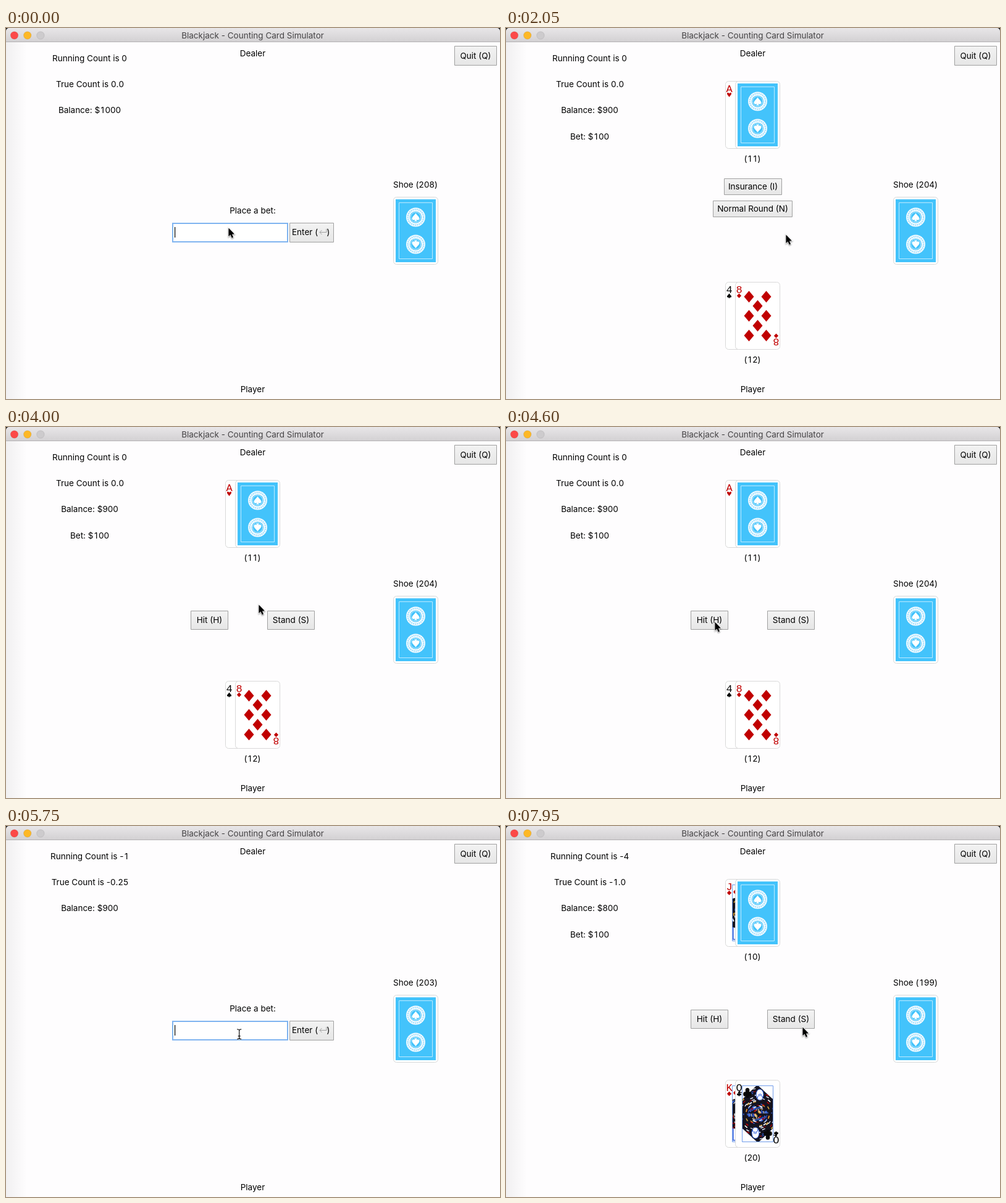
An HTML page with a canvas that plays this animation: 800 px wide and 602 px high, repeating every 8 s.

```html
<!DOCTYPE html>
<html lang="en">
<head>
<meta charset="utf-8">
<title>Blackjack</title>
<style>
  html, body { margin: 0; width: 100%; height: 100%; overflow: hidden; background: #fefdfe; }
  canvas { display: block; }
</style>
</head>
<body>
<canvas id="stage" width="800" height="602"></canvas>
<script>
const ctx = document.getElementById('stage').getContext('2d');
const LOOP = 8000, RED = '#c00000', BLUE = '#43c3fb', ROYAL = '#2f5fdc', GOLD = '#d9a53a', INK = '#141420';

// Suit outlines in a box from -1 to 1.
const SUITS = {
  S: new Path2D('M0-1C.3-.5 1-.1 1 .35C1 .8.35.85.12.5L.38 1H-.38L-.12.5C-.35.85-1 .8-1 .35C-1-.1-.3-.5 0-1Z'),
  H: new Path2D('M0 1C-.3.4-1 0-1-.5C-1-1.1-.2-1.1 0-.5C.2-1.1 1-1.1 1-.5C1 0 .3.4 0 1Z'),
  D: new Path2D('M0-1L1 0L0 1L-1 0Z'),
  C: new Path2D('M.15-.3L.15.5L.4 1H-.4L-.15.5V-.3Z')
};
for (const [x, y] of [[0, -.52], [-.5, .25], [.5, .25]]) {
  SUITS.C.moveTo(x + .48, y);
  SUITS.C.arc(x, y, .48, 0, 7);
}

// Each state keeps what it does not change.
const states = [
  { at: 0, mode: 'bet', running: '0', trueCount: '0.0', balance: 1000, shoe: 208, typeAt: 725 },
  { at: 1350, mode: 'insurance', balance: 900, shoe: 204, dealer: ['AH'], dealerSum: 11, player: ['4S', '8D'], playerSum: 12 },
  { at: 3950, mode: 'play' },
  { at: 4800, mode: 'bust', running: '-1', trueCount: '-0.25', shoe: 203, player: ['4S', '8D', 'KS'], playerSum: 22 },
  { at: 5450, mode: 'bet', typeAt: 6725 },
  { at: 7400, mode: 'play', running: '-4', trueCount: '-1.0', balance: 800, shoe: 199, dealer: ['JD'], dealerSum: 10, player: ['KD', 'QC'], playerSum: 20 }
];

// Pointer moves: start, end, x, y.
const moves = [
  [0, 0, 360, 324], [50, 850, 435, 330], [1250, 2050, 453, 335], [2100, 3400, 409, 288],
  [4300, 4600, 338, 316], [5100, 5400, 375, 339], [5600, 6400, 404, 326], [7300, 7950, 480, 326]
];

function paint(fill, stroke, lineWidth = 1) {
  if (fill) { ctx.fillStyle = fill; ctx.fill(); }
  if (stroke) { ctx.strokeStyle = stroke; ctx.lineWidth = lineWidth; ctx.stroke(); }
}

function rect(x, y, w, h, fill, stroke, lineWidth, radius = 0) {
  ctx.beginPath();
  ctx.roundRect(x, y, w, h, radius);
  paint(fill, stroke, lineWidth);
}

function ellipse(x, y, rx, ry, fill, stroke, lineWidth) {
  ctx.beginPath();
  ctx.ellipse(x, y, rx, ry, 0, 0, 2 * Math.PI);
  paint(fill, stroke, lineWidth);
}

const disc = (x, y, r, ...style) => ellipse(x, y, r, r, ...style);

function polygon(points) {
  ctx.beginPath();
  for (let i = 0; i < points.length; i += 2) ctx.lineTo(points[i], points[i + 1]);
  ctx.closePath();
}

// Digits all take the width of a zero.
function text(s, x, y, { align = 'center', color = '#000', font = '13.5px Inter, sans-serif' } = {}) {
  ctx.font = font;
  ctx.fillStyle = color;
  ctx.textAlign = 'left';
  const parts = s.split(/(\d)/);
  const width = part => ctx.measureText(/\d/.test(part) ? '0' : part).width;
  const total = parts.reduce((sum, part) => sum + width(part), 0);
  if (align === 'center') x -= total / 2;
  for (const part of parts) {
    const slot = width(part);
    ctx.fillText(part, x + (slot - ctx.measureText(part).width) / 2, y);
    x += slot;
  }
  return x;
}

function at(x, y, angle, draw) {
  ctx.save();
  ctx.translate(x, y);
  ctx.rotate(angle);
  draw();
  ctx.restore();
}

function vertical(y, h, top, bottom) {
  const g = ctx.createLinearGradient(0, y, 0, y + h);
  g.addColorStop(0, top);
  g.addColorStop(1, bottom);
  return g;
}

function suit(s, x, y, rx, ry, color, angle = 0) {
  at(x, y, angle, () => {
    ctx.scale(rx, ry);
    ctx.fillStyle = color;
    ctx.fill(SUITS[s]);
  });
}

function bothHalves(draw) {
  at(0, 0, 0, draw);
  at(73, 110, Math.PI, draw);
}

function cardBack(x, y) {
  rect(x + .5, y + .5, 72, 109, '#fff', '#d9d9d9', 1, 5);
  rect(x + 4, y + 4, 65, 102, BLUE);
  rect(x + 9.5, y + 9.5, 54, 91, null, '#bdeaff');
  for (const side of [-1, 1]) at(x + 36.5, y + 55 + 22 * side, side > 0 ? Math.PI : 0, () => {
    disc(0, 0, 15.5, '#f4fbff');
    ctx.setLineDash([2, 1.2]);
    disc(0, 0, 12.7, null, '#a5e0fc', 2.5);
    ctx.setLineDash([]);
    disc(0, 0, 9.6, BLUE);
    disc(0, 0, 8.2, null, '#e6f7ff', .8);
    suit('S', 0, 0, 6, 6.5, '#fff');
  });
}

// A robe of small strokes that circle the middle of the card.
function courtHalf(rank, s, color) {
  const queen = rank === 'Q', faceX = queen ? 40 : 45;
  let seed = rank.charCodeAt(0);
  const random = () => (seed = seed * 16807 % 2147483647) / 2147483647;
  random();
  ctx.beginPath();
  ctx.rect(11, 9, 51, 46.5);
  ctx.clip();
  if (!queen) {
    rect(22, 10, 31, 8, GOLD, INK);
    rect(56, 12, 4, 40, '#fff', ROYAL, 1.5);
  }
  ctx.save();
  polygon([11, 56, 11, 32, 36, queen ? 8 : 26, 62, 32, 62, 56]);
  paint(INK);
  ctx.clip();
  for (let i = 0; i < 150; i++) {
    const r = 3 + 40 * random(), a = Math.PI * (1 + random());
    ctx.beginPath();
    ctx.arc(36.5, 55, r, a, a + 5 / r);
    paint(null, [RED, GOLD, ROYAL, INK, '#e9edfa'][Math.floor(random() * 5)], 1 + random());
  }
  ctx.restore();
  ellipse(faceX, 24, queen ? 6 : 9, 9, '#fff', ROYAL);
  for (let i = -2; i <= 2; i++) rect(faceX + 2 * i, 22 + i * i, 1, 4, ROYAL);
  suit(s, 20, 21, 7, 8, color);
}

function pips(rank) {
  if (rank === 'A') return [[0, 0]];
  const corners = [[-14, -31], [14, -31], [-14, 32], [14, 32]];
  return rank === '4' ? corners : [...corners, [-14, 0], [14, 0], [0, -16], [0, 16]];
}

function card(name, x, y) {
  const [rank, s] = name, color = 'HD'.includes(s) ? RED : '#080808';
  at(x, y, 0, () => {
    rect(.5, .5, 72, 109, '#fff', '#d9d9d9', 1, 5);
    if ('JQK'.includes(rank)) {
      bothHalves(() => courtHalf(rank, s, color));
      rect(11.5, 9.5, 50, 91, null, '#6f9bea');
    } else {
      for (const [dx, dy] of pips(rank)) suit(s, 36.5 + dx, 55 + dy, s === 'D' ? 8 : 6.5, 9.5, color, dy > 0 ? Math.PI : 0);
    }
    bothHalves(() => {
      text(rank, 6.5, 18, { color, font: '17px "Liberation Mono", monospace' });
      suit(s, 6.5, 22.5, 3.6, 3.8, color);
    });
  });
}

function hand(cards, y, sum, hidden) {
  const left = 371 - 8 * (cards.length + (hidden ? 1 : 0));
  cards.forEach((name, i) => card(name, left + 16 * i, y));
  if (hidden) cardBack(left + 16 * cards.length, y);
  text(`(${sum})`, 399, y + 131);
}

function button(label, x, y, w, h) {
  rect(x + .5, y + .5, w - 1, h - 1, vertical(y, h, '#f3f3f3', '#e6e6e6'), '#a0a0a0');
  text(label, x + w / 2, Math.floor(y + h / 2 + 5));
}

function betForm(typed, t) {
  text('Place a bet:', 399.5, 301);
  rect(270, 317, 186, 30, '#fff', '#80b4f0', 2);
  const end = text(typed, 275, 337, { align: 'left' });
  if (t % 900 < 600) rect(typed ? end + .5 : 273, 323, 1.2, 17, '#000');
  button('', 459, 316, 72, 32);
  text('Enter (', 463, 336, { align: 'left' });
  text(')', 522, 336);
  ctx.beginPath();
  ctx.stroke(new Path2D('M519 326V331.5H508M511.5 328L508 331.5L511.5 335'));
}

function chrome() {
  const shade = ctx.createLinearGradient(0, 0, 34, 0);
  shade.addColorStop(0, '#f1f0f1');
  shade.addColorStop(1, '#fefdfe');
  rect(0, 0, 800, 602, '#fefdfe');
  rect(0, 23, 34, 579, shade);
  rect(0, 0, 800, 8, '#1c1c1c');
  rect(0, 0, 800, 23, vertical(0, 23, '#e8e6e8', '#d2d0d2'), null, 0, [5, 5, 0, 0]);
  rect(0, 22, 800, 1, '#b3b1b3');
  ['#fc4948', '#fdb826', '#cdcbcd'].forEach((color, i) => disc(13.5 + 21.2 * i, 12, 6.2, color, 'rgba(0,0,0,.12)', .7));
  text('Blackjack - Counting Card Simulator', 399.5, 17, { color: '#454345' });
}

function drawPointer(t, beam) {
  let x = 0, y = 0;
  for (const [start, end, toX, toY] of moves) {
    if (t < start) break;
    const k = Math.min(1, (t - start) / (end - start || 1)), ease = start === end ? 1 : k * k * (3 - 2 * k);
    x += (toX - x) * ease;
    y += (toY - y) * ease;
  }
  at(x, y, 0, () => {
    if (beam) {
      const path = new Path2D('M-3.5-8Q0-8 0-6Q0-8 3.5-8M0-6V6M-3.5 8Q0 8 0 6Q0 8 3.5 8M-2 3H2');
      ctx.strokeStyle = '#fff';
      ctx.lineWidth = 2.5;
      ctx.stroke(path);
      ctx.strokeStyle = '#111';
      ctx.lineWidth = 1.2;
      ctx.stroke(path);
    } else {
      ctx.shadowColor = 'rgba(0,0,0,.35)';
      ctx.shadowBlur = 2;
      ctx.shadowOffsetY = 1;
      polygon([.5, .5, .5, 14, 3.6, 11.2, 5.8, 16.4, 8, 15.4, 5.8, 10.4, 9.9, 10.2]);
      paint(null, '#fff', 2);
      paint('#000');
    }
  });
}

function draw(t) {
  const s = Object.assign({}, ...states.filter(state => state.at <= t));
  chrome();
  text('Running Count is ' + s.running, 135.5, 54);
  text('True Count is ' + s.trueCount, 136, 96);
  text('Balance: $' + s.balance, 135.5, 138);
  text('Dealer', 399.5, 46);
  text('Player', 399.5, 591);
  text(`Shoe (${s.shoe})`, 663, 259);
  button('Quit (Q)', 726, 29, 69, 32);
  cardBack(627, 274);
  if (s.mode === 'bet') {
    betForm('100'.slice(0, Math.max(0, Math.floor((t - s.typeAt) / 125))), t);
  } else {
    text('Bet: $100', 135.5, 181);
    hand(s.dealer, 86, s.dealerSum, true);
    hand(s.player, 412, s.playerSum);
  }
  if (s.mode === 'insurance') {
    button('Insurance (I)', 353, 244, 94, 27);
    button('Normal Round (N)', 335, 280, 129, 27);
  } else if (s.mode === 'play') {
    button('Hit (H)', 299, 298, 61, 31);
    button('Stand (S)', 423, 298, 77, 31);
  } else if (s.mode === 'bust') {
    text('Player busted!', 399.5, 272);
    button('Play Again (P)', 346, 325, 107, 32);
  }
  drawPointer(t, s.mode === 'bet' && t > 50);
}

function frame() {
  draw(performance.now() % LOOP);
  requestAnimationFrame(frame);
}
frame();
</script>
</body>
</html>
```
